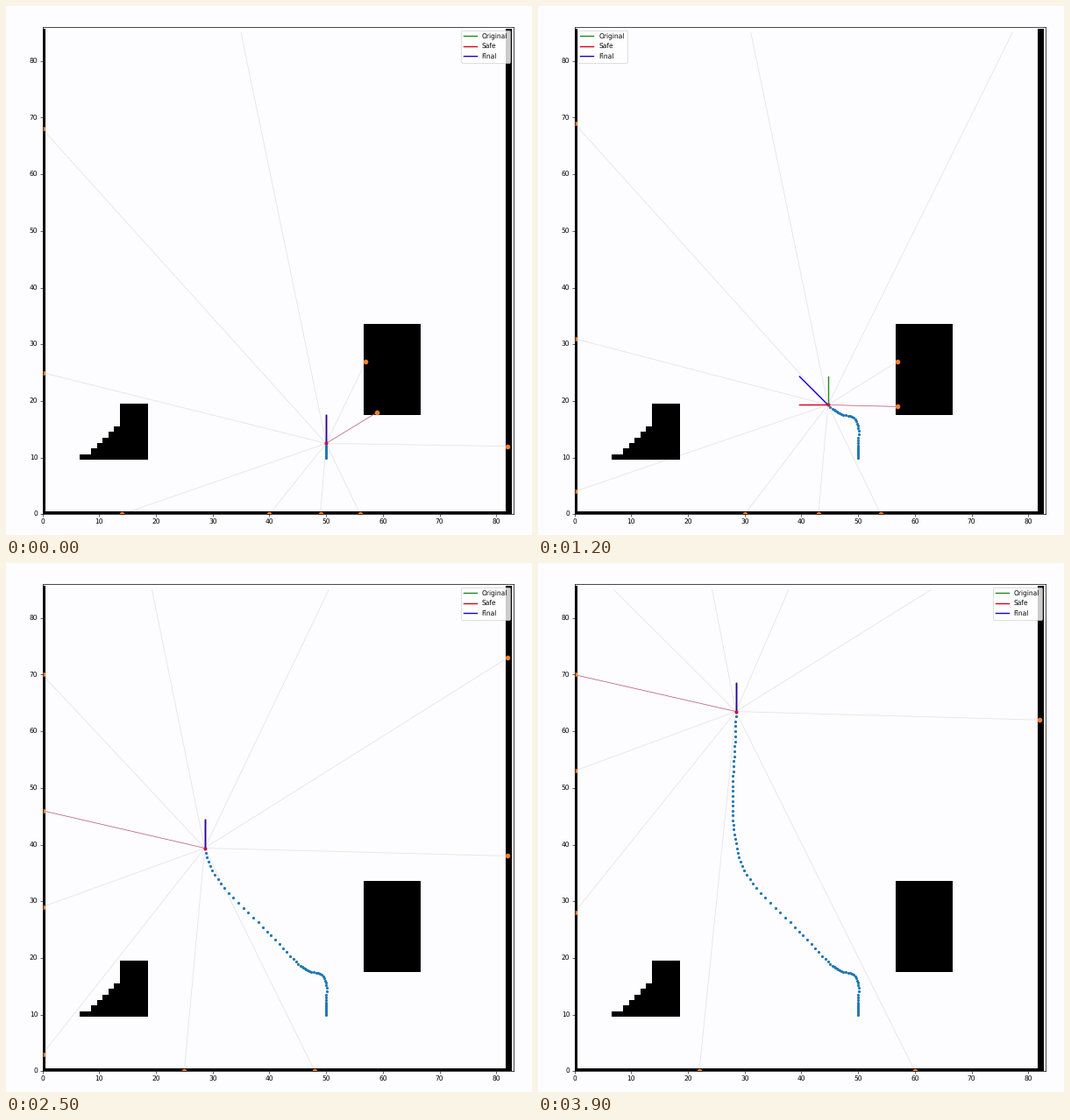
These frames come from a looping animation (600x604 px, 4000 ms). A matplotlib script:

```python
import numpy as np
import matplotlib.pyplot as plt
from matplotlib.animation import FuncAnimation
from matplotlib.colors import ListedColormap

FRAMES, INTERVAL = 40, 100
W, H, DPI = 600, 604, 64
XMAX, YMAX = 83, 86
PT = 72 / DPI            # points per pixel
EM = 7.5 * PT            # text size
PAPER, INK = "#fdfcfe", "black"
ARROW = 5
AVOID = range(1, 20)     # frames spent steering away from the block

# Solid cells as (left, bottom, right, top), centres included
BLOCKS = [(57, 18, 66, 33), (14, 10, 18, 19)]
BLOCKS += [(c, 10, c, max(10, c + 2)) for c in range(7, 14)]
RIGHT, TOP = 82, 85

# Robot route: step, x, y
ROUTE = np.array([
    (-8, 50, 10), (0, 50, 12.5), (6, 49.95, 15.65), (10, 49.24, 17),
    (16, 47.03, 17.7), (24, 44.68, 19.3), (32, 39.6, 24.7), (42, 31.5, 33.1),
    (47, 29.2, 37), (52, 28.35, 41), (78, 28.45, 63.5)])
SLOPES = np.gradient(ROUTE[:, 1:], ROUTE[:, 0], axis=0)

# Sensor bearings in degrees, drifting from the first set to the second
SCAN_START = np.array([-1.4, 32, 63.6, 101.7, 132, 165.8, 199.2, 232, 264.5, 295.5])
SCAN_END = np.array([-1.4, 32, 66.6, 101, 135, 166.8, 199.8, 231.4, 263.8, 296.5])


def route(step):
    """Smooth position on the route (cubic Hermite)."""
    t = ROUTE[:, 0]
    i = int(np.clip(np.searchsorted(t, step, "right") - 1, 0, len(t) - 2))
    h = t[i + 1] - t[i]
    u = (step - t[i]) / h
    return ((1 + 2 * u) * (1 - u) ** 2 * ROUTE[i, 1:]
            + u * (1 - u) ** 2 * h * SLOPES[i]
            + u * u * (3 - 2 * u) * ROUTE[i + 1, 1:]
            + u * u * (u - 1) * h * SLOPES[i + 1])


def entry(pos, d, box):
    """Distance along the ray to a block, or infinity."""
    lo = (np.array(box[:2]) - pos) / d
    hi = (np.array(box[2:]) - pos) / d
    near, far = np.minimum(lo, hi).max(), np.maximum(lo, hi).min()
    return near if 0 < near <= far else np.inf


def cast(pos, bearing):
    """Ray end and whether it stopped at something solid."""
    a = np.radians(bearing)
    d = np.array([np.cos(a), np.sin(a)])
    side = ((RIGHT if d[0] > 0 else 0) - pos[0]) / d[0]
    level = ((TOP if d[1] > 0 else 0) - pos[1]) / d[1]
    reach = min([side, level] + [entry(pos, d, b) for b in BLOCKS])
    end = pos + reach * d
    if d[1] > 0 and reach == level:
        return end, False
    return np.round(end), True


def octant(v):
    """Closest of the eight grid directions."""
    a = np.round(np.arctan2(v[1], v[0]) / (np.pi / 4)) * np.pi / 4
    return np.round([np.cos(a), np.sin(a)])


plt.rcParams.update({
    "font.family": "DejaVu Sans", "font.size": EM, "text.hinting": "none",
    "axes.linewidth": 0.7 * PT, "patch.linewidth": 0.75 * PT,
})
for axis in ("xtick", "ytick"):
    plt.rcParams.update({f"{axis}.major.size": 2.6 * PT,
                         f"{axis}.major.width": 0.6 * PT,
                         f"{axis}.major.pad": 2.6 * PT})

fig = plt.figure(figsize=(W / DPI, H / DPI), dpi=DPI, facecolor=PAPER)
ax = fig.add_axes([41.5 / W, 23.7 / H, 537.3 / W, 556.3 / H], facecolor=PAPER)

grid = np.zeros((TOP + 1, RIGHT + 1))
grid[:, [0, RIGHT]] = grid[0] = 1
for x0, y0, x1, y1 in BLOCKS:
    grid[y0:y1 + 1, x0:x1 + 1] = 1
ax.imshow(grid, cmap=ListedColormap([PAPER, INK]), origin="lower",
          aspect="auto", interpolation="nearest")
ax.set(xlim=(0, XMAX), ylim=(0, YMAX),
       xticks=range(0, 81, 10), yticks=range(0, 81, 10))


def line(color, width, z, **kw):
    return ax.plot([], [], color=color, lw=width * PT, zorder=z, **kw)[0]


def dots(color, size, z):
    return ax.scatter([], [], s=(size * PT) ** 2, color=color, lw=0, zorder=z)


rays = [line((0.3, 0.3, 0.45, 0.14), 0.8, 2) for _ in SCAN_START]
nearest_ray = line("#c85a7a", 0.7, 2.1)
trail = dots("#1f77b4", 3.2, 2.2)
hits = dots("#f08030", 5.6, 2.3)
arrows = [line(color, 1.4, 2.6, label=name) for name, color in
          [("Original", "#1e8c1e"), ("Safe", "#d6001e"), ("Final", "#1400d0")]]
robot = dots("#c8103c", 4, 2.9)
ax.legend(loc="best")


def draw(frame):
    step = 2 * frame
    pos = route(step)
    drift = (frame / (FRAMES - 1)) ** 3
    ends = [cast(pos, b) for b in SCAN_START + drift * (SCAN_END - SCAN_START)]
    solid = np.array([p for p, hit in ends if hit])
    near = solid[np.argmin(np.hypot(*(solid - pos).T))]

    for ray, (p, _) in zip(rays, ends):
        ray.set_data(*zip(pos, p))
    nearest_ray.set_data(*zip(pos, near))
    hits.set_offsets(solid)
    trail.set_offsets([route(s) for s in range(-8, step)])
    robot.set_offsets([pos])

    wish = np.array([0.0, 1.0])
    safe = final = wish
    if frame in AVOID:
        safe = -octant(near - pos)
        final = np.sign(wish + safe)
    for arrow, d in zip(arrows, (wish, safe, final)):
        arrow.set_data(*zip(pos, pos + ARROW * d))
    return []


anim = FuncAnimation(fig, draw, frames=FRAMES, interval=INTERVAL,
                     init_func=lambda: draw(0), repeat=True, repeat_delay=0,
                     blit=False)
plt.show()
```
